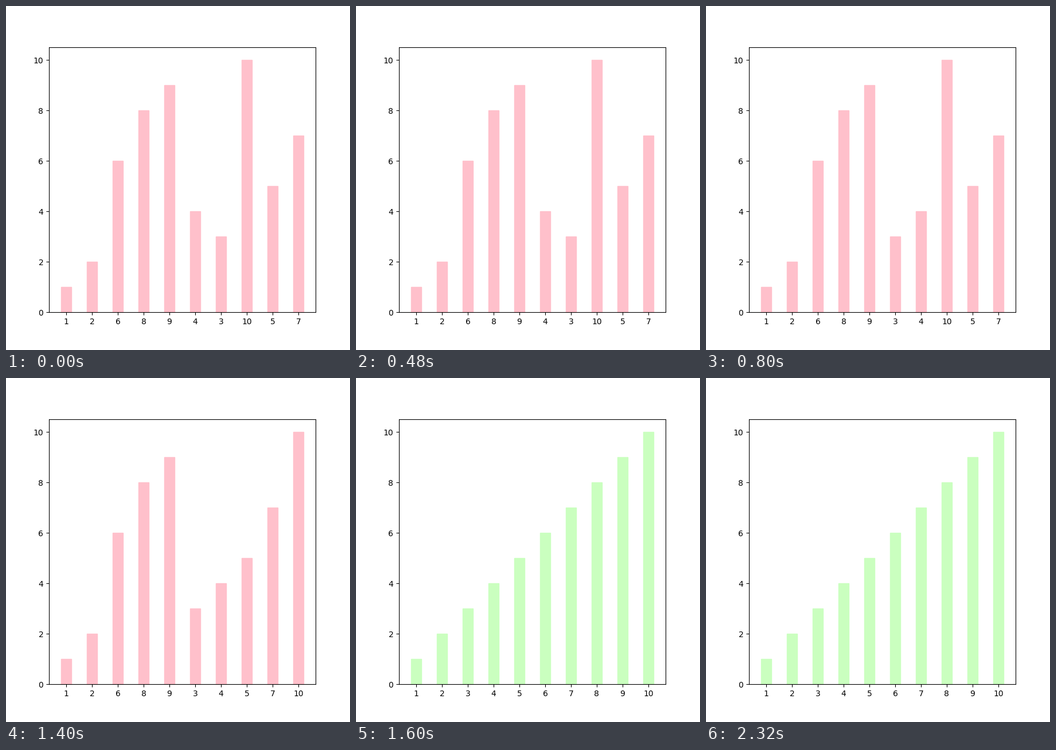
A matplotlib script for the animation above (2800 ms loop, 600 by 600 pixels).

```python
import matplotlib.pyplot as plt
from matplotlib.animation import FuncAnimation

VALUES = [1, 2, 6, 8, 9, 4, 3, 10, 5, 7]
STEP_MS = 200
FRAMES = 14
BUSY, DONE = "pink", "#caffbf"


def merge_sort(values, low, high):
    """Sort values[low..high] in place, yielding a snapshot after each merge."""
    if low >= high:
        return
    mid = (low + high) // 2
    yield from merge_sort(values, low, mid)
    yield from merge_sort(values, mid + 1, high)
    values[low:high + 1] = sorted(values[low:high + 1])
    yield list(values)


steps = list(merge_sort(list(VALUES), 0, len(VALUES) - 1))
positions = range(len(VALUES))

fig, ax = plt.subplots(figsize=(6, 6), dpi=100)
bars = ax.bar(positions, VALUES, width=0.4, color=BUSY)
ax.set_xticks(positions, [str(v) for v in VALUES])


def draw(frame):
    step = min(frame, len(steps) - 1)
    heights = steps[step]
    color = DONE if step == len(steps) - 1 else BUSY
    for bar, height in zip(bars, heights):
        bar.set_height(height)
        bar.set_color(color)
    ax.set_xticklabels([str(h) for h in heights])
    return list(bars)


anim = FuncAnimation(fig, draw, frames=FRAMES, interval=STEP_MS,
                     init_func=lambda: draw(0), repeat=True, repeat_delay=0)
plt.show()
```
